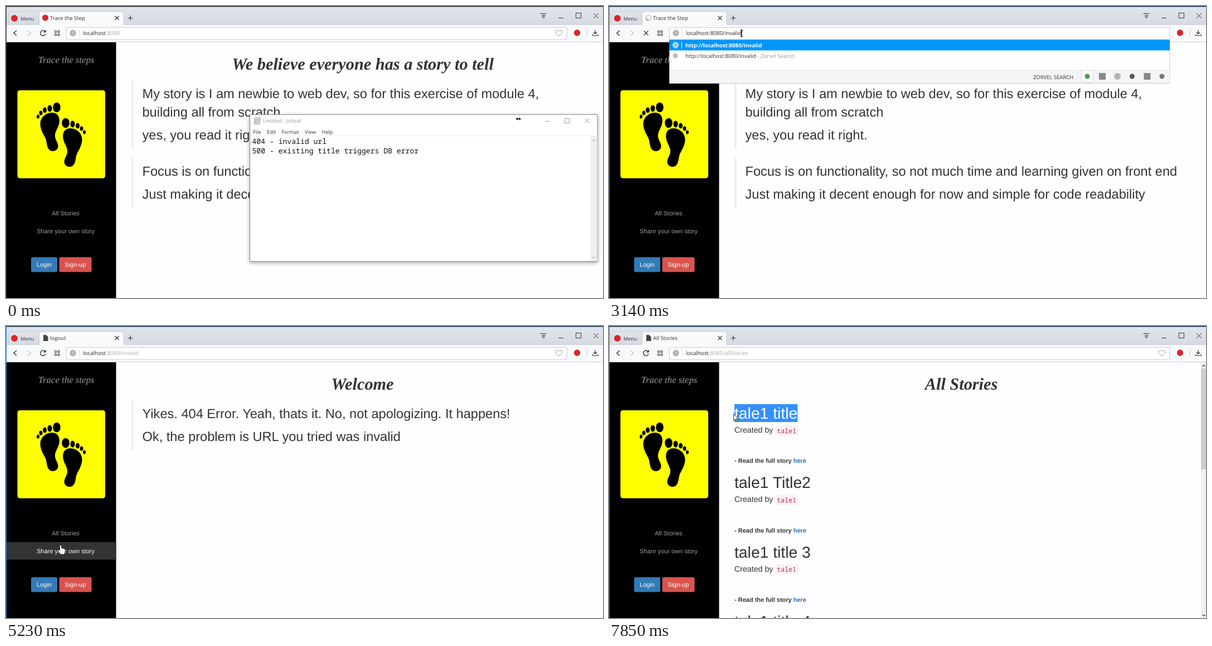
An HTML page that plays this animation: 1071x523 px, repeating every 8000 ms.

```html
<!DOCTYPE html>
<html lang="en">
<head>
<meta charset="utf-8">
<title>Story site error pages</title>
<style>
html, body { margin: 0; width: 100%; height: 100%; overflow: hidden; background: #fff; }
svg { display: block; width: 100%; height: 100%; }
text { white-space: pre; text-rendering: geometricPrecision; }
.ui { font: 9.5px "Open Sans", "Noto Sans", sans-serif; fill: #333; }
.url { font-size: 9.8px; }
.page { font: 23.6px "Liberation Sans", Arial, sans-serif; fill: #333; }
.script { font: italic bold 30.3px "Liberation Serif", serif; text-anchor: middle; }
.side { font: 11px "Liberation Sans", Arial, sans-serif; fill: #9d9d9d; text-anchor: middle; }
.brand { font: italic 16.8px "Liberation Serif", serif; fill: #9d9d9d; text-anchor: middle; }
.mono { font: 13.1px "Noto Sans Mono", "DejaVu Sans Mono", monospace; fill: #111; }
.story-title { font-size: 28.3px; }
.story-by { font-size: 14.2px; }
.story-code { font: 11.7px "Noto Sans Mono", monospace; fill: #c7254e; }
.story-link { font-size: 11px; font-weight: bold; }
.line { fill: none; stroke: #333; stroke-width: 1.2; }
.soft { fill: none; stroke: #999; }
.grey { fill: #999; }
.white { fill: #fff; }
</style>
</head>
<body>
<svg viewBox="0 0 1071 523">
  <defs>
    <linearGradient id="bar" x2="0" y2="1"><stop stop-color="#e1e6ed"/><stop offset="1" stop-color="#d5dae2"/></linearGradient>
    <filter id="shadow" x="-5%" y="-8%" width="110%" height="120%"><feDropShadow dx="0" dy="2" stdDeviation="3.5" flood-opacity=".35"/></filter>
    <clipPath id="selected"><rect id="selectedBox" y="140" height="32"/></clipPath>
    <g id="foot">
      <ellipse cx="91" cy="181.500" rx="6.800" ry="8.800"/>
      <ellipse cx="78.500" cy="183.500" rx="4" ry="6"/>
      <ellipse cx="69.500" cy="186.500" rx="3.500" ry="5"/>
      <ellipse cx="62.500" cy="191.500" rx="3" ry="4"/>
      <ellipse cx="57.500" cy="198" rx="2.500" ry="3.500"/>
      <path d="M61.500 212C61 200 71 191.500 82 191C93 191 97 199 95.500 209C94 219 87 225 88 234C89 241 93.500 245 93.500 251C93 260 83 262 78 258C72 252 74 243 70 235C66 228 62 221 61.500 212Z"/>
    </g>
    <g id="globe" fill="none"><circle r="5"/><ellipse rx="2.300" ry="5"/><path d="M-5 0H5M-4.300-2.500H4.300M-4.300 2.500H4.300"/></g>
  </defs>
  <rect width="1071" height="523" fill="#fefefe"/>

  <!-- Pages -->
  <g class="page">
    <g id="home">
      <text class="script" x="640" y="114">We believe everyone has a story to tell</text>
      <path d="M225 133h4v122h-4zM225 271h4v90h-4z" fill="#eee"/>
      <text x="244.500" y="165.400">My story is I am newbie to web dev, so for this exercise of module 4,</text>
      <text x="244.500" y="198.400">building all from scratch</text>
      <text x="244.500" y="239.400">yes, you read it right.</text>
      <text x="244.500" y="304.200">Focus is on functionality, so not much time and learning given on front end</text>
      <text x="244.500" y="345">Just making it decent enough for now and simple for code readability</text>
    </g>
    <g id="missing">
      <text class="script" x="639.500" y="114">Welcome</text>
      <path d="M225 133h4v89h-4z" fill="#eee"/>
      <text x="244.500" y="165.400">Yikes. 404 Error. Yeah, thats it. No, not apologizing. It happens!</text>
      <text x="244.500" y="206.400">Ok, the problem is URL you tried was invalid</text>
    </g>
    <g id="stories">
      <text class="script" x="632" y="114">All Stories</text>
      <g id="storyList"></g>
      <g clip-path="url(#selected)">
        <rect x="220" y="140" width="125" height="32" fill="#3390ff"/>
        <text id="firstTitle" class="story-title white" x="225" y="166">tale1 title</text>
      </g>
      <path d="M1062 65h9v458h-9z" fill="#f0f0f0"/>
      <path d="M1062 76h9v181h-9z" fill="#cdcdcd"/>
      <path class="line" d="M1064.500 72.500l2.500-2.500 2.500 2.500M1064.500 517l2.500 2.500 2.500-2.500"/>
    </g>
  </g>

  <!-- Sidebar -->
  <path d="M1 65h196.500v458H1z"/>
  <g id="sidebar">
    <text class="brand" x="108" y="102">Trace the steps</text>
    <rect x="20.500" y="151" width="157.500" height="157.500" rx="4.500" fill="#ff0"/>
    <use href="#foot"/><use href="#foot" transform="matrix(-1 0 0 1 198 28)"/>
    <rect id="hover" x="1" width="196.500" height="31.500" fill="#333"/>
    <g class="side">
      <text id="link0" x="107" y="375">All Stories</text>
      <text id="link1" x="107" y="407">Share your own story</text>
      <rect x="45" y="450" width="47" height="26.500" rx="3" fill="#337ab7"/>
      <rect x="95.500" y="450" width="58" height="26.500" rx="3" fill="#d9534f"/>
      <text class="white" x="68.500" y="467.300">Login</text>
      <text class="white" x="124.300" y="467.300">Sign-up</text>
    </g>
  </g>

  <!-- Browser frame -->
  <path d="M0 0h1071v34H0z" fill="url(#bar)"/>
  <path d="M0 33h1071v32H0z" fill="#f8f9fb"/>
  <path d="M0 33.500H1071M0 64.500H1071" stroke="#cdd2da"/>
  <path d="M5.500 33V13q0-3 3-3H59" fill="#dfe3e9" stroke="#c8cdd5"/>
  <path d="M59.500 34V13q0-3 3-3H208q3 0 3 3V34z" fill="#f9fafb"/>
  <path d="M59.500 33V13q0-3 3-3H208q3 0 3 3V33" fill="none" stroke="#c5cad2"/>
  <circle cx="15" cy="22" r="6" fill="#d9272e"/>
  <text class="ui" x="26" y="25.500" style="font-size:9px">Menu</text>
  <circle id="homeIcon" cx="70.500" cy="21" r="5.500" fill="#d8262c"/>
  <path id="fileIcon" d="M67 16h5l3.500 3.500V27H67z" fill="#444"/>
  <g id="spinner" fill="none" stroke-width="1.800"><circle cx="71" cy="21" r="4.700" stroke="#ccc"/><path id="spinArc" d="M71 16.300A4.700 4.700 0 0 1 75.700 21" stroke="#888"/></g>
  <text id="tabTitle" class="ui" x="79" y="25"></text>
  <g class="line">
    <path d="M195.500 18l7 7m0-7l-7 7M218.500 21.500h9m-4.500-4.500v9"/>
    <path d="M958.500 13.500h11M961 16.500h6.500M961.500 19h5l-2.500 2.500zM991 21.500h9M1022.500 12.500h9v9h-9zM1054 13l9 9m0-9l-9 9" stroke-width="1"/>
    <path d="M19 44l-5 4.500 5 4.500" stroke-width="1.400"/>
    <path d="M39 44l5 4.500-5 4.500" stroke="#bbb"/>
    <path d="M87.500 44.500h3v3h-3zm5.500 0h3v3h-3zm-5.500 5.500h3v3h-3zm5.500 0h3v3h-3z" stroke-width="1"/>
    <path id="reload" d="M70.500 46a4.700 4.700 0 1 0 .5 4M71 43v3.500h-3.500" stroke-width="1.400"/>
    <path id="stop" d="M62.500 44.500l8 8m0-8l-8 8"/>
    <path d="M1057 43v7m-3-3l3 3 3-3M1052.500 50.500v2.500h9.500v-2.500"/>
  </g>
  <path d="M1042.500 42v13" stroke="#ccc"/>
  <circle cx="1024.500" cy="48" r="5.700" fill="#d9272e"/>
  <path d="M108.500 38.500h897.500v21.500H108.500z" fill="#fff" stroke="#c6cbd3"/>
  <use href="#globe" x="120" y="48.500" stroke="#888"/>
  <path d="M131.500 42v13" stroke="#ddd"/>
  <path id="heart" class="soft" d="M992 53.500C980 46 989 40.500 992 45.500C995 40.500 1004 46 992 53.500Z"/>
  <path id="urlBack" d="M138 42h66v14h-66z" fill="#0078d7"/>
  <text id="url" class="ui url" x="138" y="52"><tspan id="host">localhost</tspan><tspan id="rest"></tspan></text>
  <path id="caret" d="M.5 42.500v13" stroke="#000"/>

  <!-- Address suggestions -->
  <g id="dropdown" class="ui">
    <rect id="dropBack" x="108.500" y="60.500" width="897.500" fill="#fff" stroke="#c6cbd3"/>
    <path d="M108 60.500h898v19H108z" fill="#0096ff"/>
    <use href="#globe" x="119.500" y="70" stroke="#fff"/>
    <path d="M130.500 64v12" stroke="#fff"/>
    <text id="exact" class="white" x="137" y="74" font-weight="bold" style="font-size:9.700px"></text>
    <circle cx="119" cy="89" r="4.500" fill="#bbb"/>
    <text x="137" y="93" style="font-size:9.700px"><tspan id="query"></tspan><tspan class="grey"> - Zorvel Search</tspan></text>
    <g id="history"></g>
    <g id="engines">
      <path d="M109 116h896.500v22H109z" fill="#f3f5f7"/>
      <path d="M109 115.500h896.500" stroke="#dde0e5"/>
      <path d="M847.500 115.500h21v20.500h-21z" fill="#fff" stroke="#d5d8dd"/>
      <text x="761" y="131">ZORVEL SEARCH</text>
      <circle cx="858" cy="126" r="4.500" fill="#4a9a50"/>
      <path d="M879 120h12v12h-12zM959.500 120h12v12h-12z" fill="#888"/>
      <circle cx="912" cy="126" r="6" fill="#b5b5b5"/>
      <circle cx="938.500" cy="126" r="4.500" fill="#555"/>
      <circle cx="992" cy="126" r="4.500" fill="#777"/>
    </g>
  </g>
  <path id="topEdge" d="M0 0h1071v1.500H0z"/>
  <path id="leftEdge" d="M0 1h1v522H0z"/>

  <!-- Text editor -->
  <g id="editor">
    <rect x="437.500" y="194.500" width="623.500" height="263" fill="#fff" stroke="#8a8a8a" filter="url(#shadow)"/>
    <path d="M446.500 200.500h9.500l-1 11h-10z" fill="#dcebf3" stroke="#8b9ba5"/>
    <path class="soft" d="M447.500 203.500h7M447 206h7M446.500 208.500h7M967 206.500h8M1002.500 201.500h8v8h-8zM1038.500 201.500l8 8m0-8l-8 8"/>
    <g class="ui" style="font-size:9.200px">
      <text class="grey" x="460.500" y="209.300">Untitled - Jotleaf</text>
      <text x="443" y="229">File</text><text x="468" y="229">Edit</text><text x="494.500" y="229">Format</text>
      <text x="536" y="229">View</text><text x="566.500" y="229">Help</text>
    </g>
    <path d="M438 232.500h622.500" stroke="#eee"/>
    <path d="M1048 233h12.500v224h-12.500z" fill="#f0f0f0"/>
    <path class="soft" d="M1051.500 242.500l3-3 3 3M1051.500 449l3 3 3-3"/>
    <text class="mono" x="441.500" y="247">404 - invalid url</text>
    <text class="mono" x="441.500" y="264">500 - existing title triggers DB error</text>
  </g>

  <!-- Pointer shapes -->
  <g id="pointer">
    <path id="arrow" d="M.5 .5V12.500L3.300 9.800 5.200 14.300 7.200 13.400 5.300 9H9z" fill="#fff" stroke="#222" stroke-width=".9"/>
    <path id="beam" d="M-2.500-6H-.6L0-5.500.6-6H2.500M0-5.500V5.500M-2.500 6H-.6L0 5.500.6 6H2.500" fill="none" stroke="#111" stroke-width="1.100"/>
    <path id="hand" d="M-1.500 10V1.500q1.500-2 3 0V6q1.500-1 2.500.5 1.500-.8 2.300.6 1.700-.5 1.700 1.400V12L6.500 17H0L-4.500 10.500Q-4 7.500-1.500 10Z" fill="#fff" stroke="#222" stroke-width=".9"/>
    <path id="resize" d="M-4.500 0l2.800-2.800v2h3.400v-2L4.500 0 1.700 2.800v-2h-3.400v2z" fill="#000"/>
  </g>
</svg>
<script>
const LOOP = 8000;
const $ = id => document.getElementById(id);
const show = (id, on) => { $(id).style.display = on ? '' : 'none'; };
const text = (id, value) => { if ($(id).textContent !== value) $(id).textContent = value; };
const last = (steps, t) => steps.filter(step => step[0] <= t).pop();
const within = (t, from, to) => t >= from && t < to;

const titles = { home: 'Trace the Step', missing: 'logout', stories: 'All Stories' };
const paths = { home: '', missing: '/invalid', stories: '/allStories' };
const TYPED = '/invalid';
const typing = [[0, 0], [2290, 1], [2360, 2], [2440, 3], [2510, 5], [2660, 6], [2740, 7], [2910, 8]];

// time, x, y, shape
const route = [
  [0, 919, 202, 'resize'], [70, 930, 215, 'arrow'], [140, 950, 270, 'beam'], [270, 900, 480, 'arrow'],
  [420, 450, 300, 'arrow'], [570, 213, 5, 'arrow'], [800, 213, 5, 'arrow'], [1000, 230, 42, 'beam'],
  [1110, 235, 49, 'beam'], [1510, 235, 49, 'beam'], [1660, 238, 49, 'beam'], [4360, 238, 49, 'beam'],
  [4440, 239, 49, 'beam'], [4610, 239, 49, 'beam'], [4690, 225, 150, 'arrow'], [4910, 181, 487, 'arrow'],
  [5000, 181, 487, 'arrow'], [5080, 212, 507, 'arrow'], [5160, 150, 440, 'arrow'], [5230, 98, 392, 'hand'],
  [5310, 98, 392, 'hand'], [5400, 106, 372, 'hand'], [5550, 114, 375, 'hand'], [6200, 114, 375, 'hand'],
  [6280, 300, 220, 'arrow'], [6390, 476, 140, 'arrow'], [6470, 433, 119, 'arrow'], [6545, 433, 119, 'arrow'],
  [6630, 322, 152, 'beam'], [6780, 322, 152, 'beam'], [7160, 345, 153, 'arrow'], [7300, 345, 153, 'arrow'],
  [7340, 338, 154, 'beam'], [7850, 223, 157, 'arrow'], [LOOP, 223, 157, 'arrow']
];

function pointerAt(t) {
  const i = route.findIndex(key => key[0] > t);
  const [t0, x0, y0, shape] = route[i - 1], [t1, x1, y1] = route[i];
  const k = (t - t0) / (t1 - t0);
  return { x: x0 + (x1 - x0) * k, y: y0 + (y1 - y0) * k, shape };
}

$('storyList').innerHTML = ['title', 'Title2', 'title 3', 'title 4'].map((name, i) => `
  <g transform="translate(0 ${i * 124.4})">
    <text class="story-title" x="225" y="166">tale1 ${name}</text>
    <text class="story-by" x="225" y="191">Created by</text>
    <rect x="298" y="178" width="42" height="18" rx="3" fill="#f9f2f4"/>
    <text class="story-code" x="301" y="191.500">tale1</text>
    <text class="story-link" x="225" y="245.300">- Read the full story <tspan fill="#1f6fb9">here</tspan></text>
  </g>`).join('');
$('history').innerHTML = ['', 'allStories', 'login', 'signup'].map((path, i) =>
  `<text x="137" y="${112 + i * 19}">http://localhost:8080/${path}</text>`).join('');

function drawAddress(t, page) {
  const editing = within(t, 1110, 3210), selected = within(t, 1110, 1340);
  const typed = TYPED.slice(0, last(typing, t)[1]);
  const open = within(t, 2290, 3210), tall = within(t, 2290, 2440);
  const path = within(t, 1110, 3290) ? typed : paths[page];
  text('rest', ':8080' + path);
  $('host').style.fill = selected ? '#fff' : '#222';
  $('rest').style.fill = selected ? '#fff' : editing ? '#222' : '#aaa';
  show('urlBack', selected);
  show('caret', within(t, 1340, 2040) || open);
  $('caret').setAttribute('transform', `translate(${Math.round(138 + $('url').getComputedTextLength())} 0)`);
  show('heart', !open);
  show('dropdown', open);
  show('history', tall);
  $('dropBack').setAttribute('height', tall ? 155 : 78);
  $('engines').setAttribute('transform', `translate(0 ${tall ? 77 : 0})`);
  text('exact', 'http://localhost:8080' + typed);
  text('query', 'http://localhost:8080' + typed);
}

function drawPointer(t) {
  const { x, y, shape } = pointerAt(t);
  for (const id of ['arrow', 'beam', 'hand', 'resize']) show(id, id === shape);
  $('pointer').setAttribute('transform', `translate(${x} ${y})`);

  const row = shape === 'hand' && t < 5780 ? (y < 387 ? 0 : 1) : -1;
  show('hover', row >= 0);
  $('hover').setAttribute('y', row ? 387 : 355.5);
  for (const i of [0, 1]) $('link' + i).style.fill = row === i ? '#fff' : '';

  return x;
}

function drawSelection(t, x) {
  const title = $('firstTitle'), right = 338.2;
  let left = right;
  if (t >= 7320) {
    const edges = [...title.textContent].map((_, i) => title.getStartPositionOfChar(i).x).concat(right);
    left = edges.reduce((best, edge) => Math.abs(edge - x) < Math.abs(best - x) ? edge : best);
  }
  $('selectedBox').setAttribute('x', left);
  $('selectedBox').setAttribute('width', right - left);
}

function draw(t) {
  const page = t < 3290 ? 'home' : t < 5850 ? 'missing' : 'stories';
  const loading = within(t, 3140, 3520) || within(t, 5700, 6010);
  const active = t >= 800;
  for (const id in titles) show(id, id === page);
  show('sidebar', !within(t, 3290, 3370) && !within(t, 5850, 5930));
  text('tabTitle', titles[page]);
  show('homeIcon', !loading && page === 'home');
  show('fileIcon', !loading && page !== 'home');
  show('spinner', loading);
  $('spinArc').setAttribute('transform', `rotate(${t * 0.4} 71 21)`);
  show('reload', !loading);
  show('stop', loading);
  show('editor', !active);
  $('topEdge').style.fill = active ? '#0f3350' : '#222';
  $('leftEdge').style.fill = active ? '#1883d7' : '#333';
  drawAddress(t, page);
  drawSelection(t, drawPointer(t));
}

const start = performance.now();
function frame() {
  draw((performance.now() - start) % LOOP);
  requestAnimationFrame(frame);
}
frame();
</script>
</body>
</html>
```
